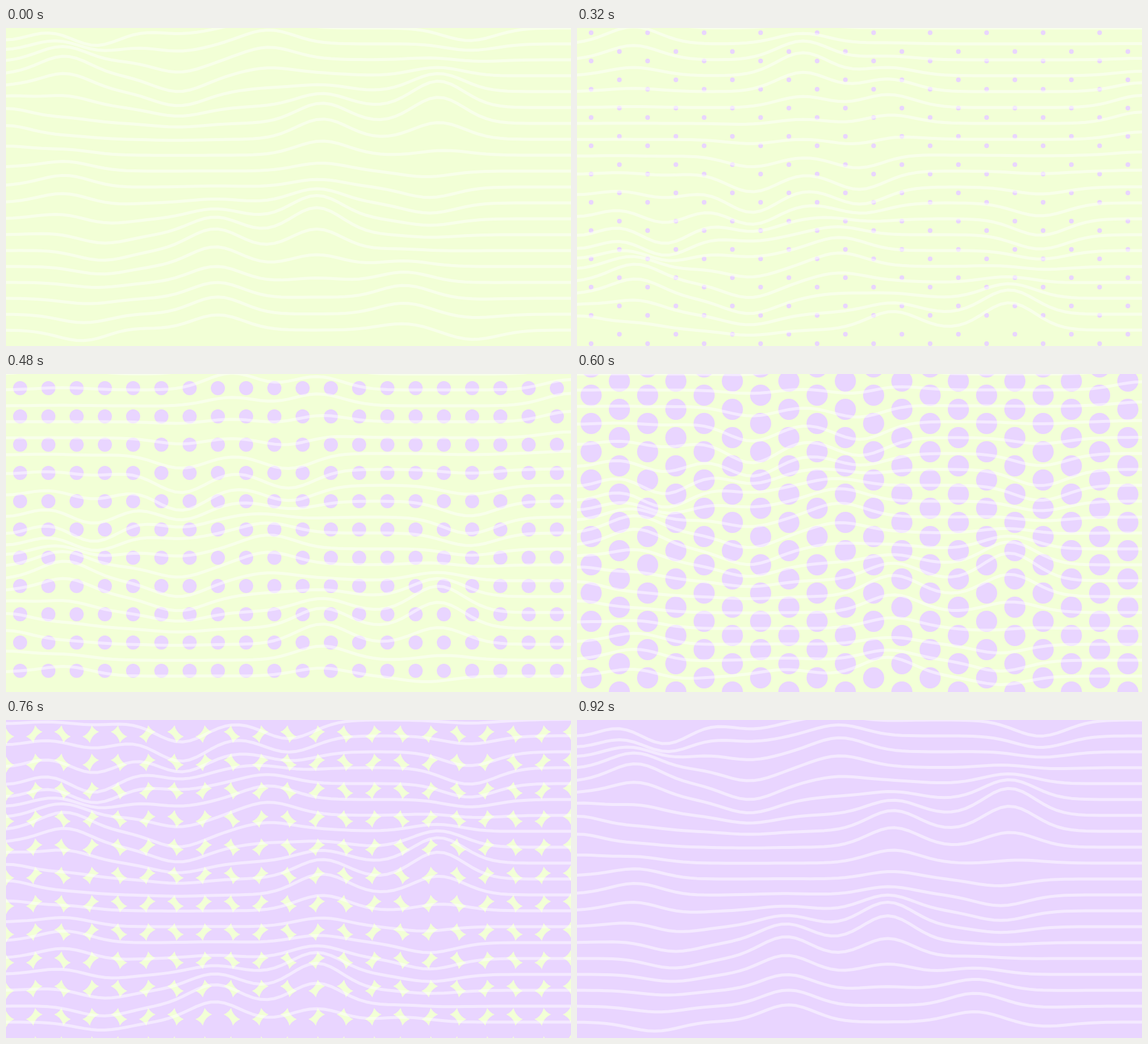
These frames come from a looping animation (960x540 px, 960 ms). An HTML page with a canvas:

```html
<!DOCTYPE html>
<html lang="en">
<head>
<meta charset="utf-8">
<title>Waves and dots</title>
<style>
  html, body { margin: 0; width: 100%; height: 100%; overflow: hidden; background: #f2ffd6; }
  canvas { display: block; width: 960px; height: 540px; }
</style>
</head>
<body>
<canvas id="stage" width="960" height="540"></canvas>
<script>
const ctx = document.getElementById('stage').getContext('2d');
const W = 960, H = 540, LOOP = 960, STEP = 40, START = 240;
const CELL = 48, ROWS = 20, GAP = H / ROWS;
const LIME = '#f2ffd6', LILAC = '#e9d5ff';

// Key points of the terrain: column, row, push in px (negative is up)
const SPREAD_X = 1.3, SPREAD_Y = 2.3;
const peaks = [
  [2, -12.3, -29], [8, -10.3, -39], [11, -8.7, -23], [20, -8, -21],
  [9.3, 1.2, -24], [2.1, 3.2, -34], [15.3, 5.5, -47], [0, 6.3, -25],
  [11.2, 6.5, -36], [2.1, 10.1, -20], [11, 12.9, -46], [7.4, 14, -36],
  [14.1, 17.1, -22], [7.5, 18.3, -28], [4.1, 21.7, -22],
  [10, -4, 32], [6.2, -3.3, 43], [0, -1.3, 28], [3.1, -1.2, 42],
  [16.4, -1.2, 28], [6.1, 3.2, 27], [15, 10.3, 19], [3.4, 13.7, 17],
  [2.8, 19.3, 20], [16.5, 21.1, 37]
];

const bell = d => Math.exp(-d * d);

const push = (col, row) => peaks.reduce((sum, [x, y, amount]) =>
  sum + amount * bell((col - x) / SPREAD_X) * bell((row - y) / SPREAD_Y), 0);

function drawLines(scroll) {
  ctx.strokeStyle = 'rgba(255, 255, 255, 0.5)';
  ctx.lineWidth = 5;
  ctx.lineJoin = 'round';
  for (let row = 0; row < ROWS; row++) {
    ctx.beginPath();
    for (let x = -12; x <= W + 12; x += 12) {
      ctx.lineTo(x, row * GAP + push(x / CELL, row + scroll));
    }
    ctx.stroke();
  }
}

// Columns drift in opposite directions while every dot grows
function drawDots(age) {
  const r = age * 0.05, shift = age * 0.1 % CELL;
  ctx.fillStyle = LILAC;
  ctx.beginPath();
  for (let col = 0; col < W / CELL; col++) {
    const x = (col + 0.5) * CELL;
    const dy = col % 2 ? -shift : shift;
    for (let y = dy - 2 * CELL; y < H + 2 * CELL; y += CELL) {
      ctx.moveTo(x + r, y);
      ctx.arc(x, y, r, 0, Math.PI * 2);
    }
  }
  ctx.fill();
}

function draw(t) {
  ctx.fillStyle = LIME;
  ctx.fillRect(0, 0, W, H);
  if (t > START) drawDots(t - START);
  drawLines((t < START ? t : t - LOOP) / LOOP * ROWS);
}

const origin = performance.now();
let last = -1;
function tick() {
  const t = Math.floor((performance.now() - origin) % LOOP / STEP) * STEP;
  if (t !== last) draw(last = t);
  requestAnimationFrame(tick);
}
tick();
</script>
</body>
</html>
```
